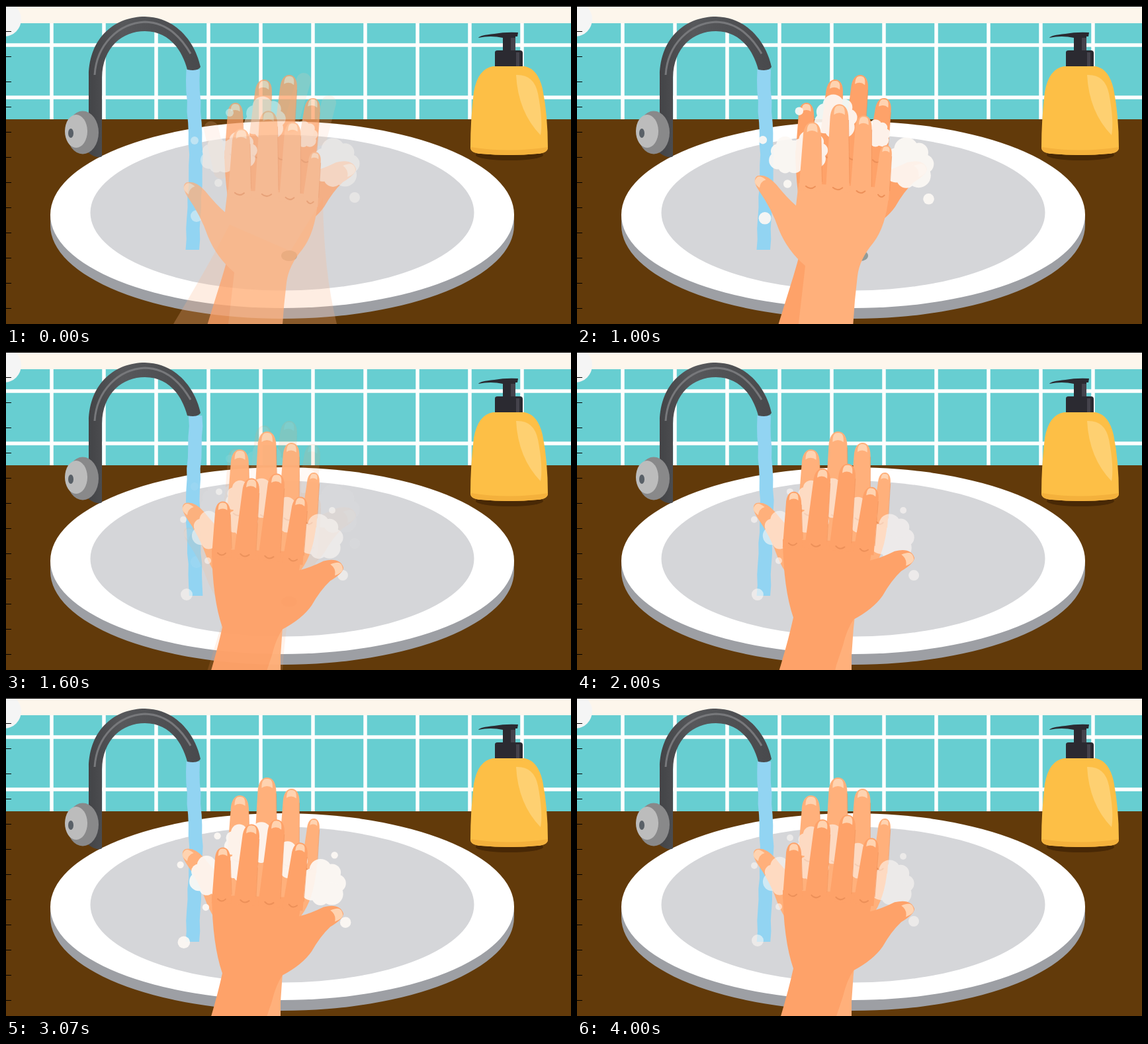
Write an HTML page that moves like this. It is 854 by 480 pixels and loops after 4070 ms.

```html
<!DOCTYPE html>
<html lang="en">
<head>
<meta charset="utf-8">
<title>Hand washing</title>
<style>
  html, body { margin: 0; width: 100%; height: 100%; overflow: hidden; background: #623a0a; }
  svg { display: block; width: 100vw; height: 100vh; }
  .left { fill: #ffb07b; }
  .right { fill: #fea269; }
  .nail { fill: #ffd3b0; }
  .crease { fill: none; stroke: #ec9059; stroke-width: 2; stroke-linecap: round; }
  .edge { fill: none; stroke: #ee9159; opacity: .6; }
  .foam { fill: #fdf9f5; }
</style>
</head>
<body>
<svg viewBox="0 0 854 480" preserveAspectRatio="none">
  <defs>
    <linearGradient id="pipe" x1="0" x2="1">
      <stop offset="0" stop-color="#434447"/><stop offset=".3" stop-color="#57585b"/>
      <stop offset="1" stop-color="#48494c"/>
    </linearGradient>
    <g id="leftHand" class="left">
      <path d="M332 570 L334 480 Q341 420 345 385 Q318 362 305 330 Q295 300 274 270 Q264 254 273 249
        Q287 246 301 262 Q318 283 331 294 L335 260 L449 266 L471 280 Q467 325 448 350 Q427 375 424 400
        Q419 440 417 480 V570Z"/>
    </g>
    <g id="rightHand" class="right">
      <path d="M280 570 L308 480 Q320 440 327 408 Q312 365 311 290 L448 294 L443 322 Q460 318 480 308
        Q505 302 510 318 Q510 326 490 338 Q475 352 462 375 Q448 395 418 411 Q408 425 402 450 L392 480 L370 570Z"/>
    </g>
  </defs>

  <rect width="854" height="26" fill="#fdf6ec"/>
  <rect y="26" width="854" height="146" fill="#67ced1"/>
  <path id="grout" stroke="#fdfefd" stroke-width="5.500"/>
  <rect y="171" width="854" height="309" fill="#623a0a"/>

  <path d="M67 315 V331 A350.5 141 0 0 0 768 331 V315Z" fill="#9d9fa4"/>
  <ellipse cx="417.5" cy="315" rx="350.5" ry="141" fill="#fff"/>
  <ellipse cx="417.5" cy="312" rx="290" ry="117.5" fill="#d5d6d9"/>
  <ellipse cx="428" cy="377" rx="12" ry="8" fill="#929b98"/>

  <path id="water" fill="#92d4f2"/>

  <path d="M125 222 V105 C126 46 166 16 210 16 C258 17 286 55 294 92 Q290 99 274 96
    C266 66 246 38 210 38 C176 38 146 62 145 108 V227 Q138 231 125 222Z" fill="url(#pipe)"/>
  <path d="M134 104 C137 58 170 26 210 24 Q252 25 279 72" fill="none" stroke="#77787b" stroke-width="3"/>
  <ellipse cx="116" cy="191" rx="24" ry="32.5" fill="#89898a"/>
  <ellipse cx="106" cy="189" rx="17" ry="25" fill="#bcbcbc"/>
  <ellipse cx="98" cy="192" rx="4" ry="7" fill="#596067"/>

  <ellipse cx="761" cy="225" rx="51" ry="8" fill="#482805"/>
  <path d="M736 91 Q713 95 707 130 Q702 172 702 214 Q702 222 718 223 Q761 227 803 223 Q819 222 819 214
    Q819 165 811 125 Q804 95 784 91Z" fill="#fdbf46"/>
  <path d="M703 213 Q761 222 819 213 Q819 222 803 223 Q761 227 718 223 Q702 222 703 213Z" fill="#f4b13c"/>
  <path d="M771 104 Q798 103 804 132 Q812 174 808 195 Q774 160 771 104Z" fill="#fed071"/>
  <path d="M739 91 V70 Q739 67 743 67 H751 V48 Q733 44 714 48 Q716 44 738 42 Q755 39 774 40 L773 46
    H770 V67 H777 Q781 67 781 71 V91Z" fill="#2b2a31"/>
  <path d="M763 48 H770 V67 H763Z M771 70 H776 V91 H771Z" fill="#45434c"/>

  <g id="trace">
    <path d="M338 330 Q310 385 253 480 H500 Q480 400 479 290 L430 370Z" fill="#fdb98f"/>
    <path d="M310 185 L325 250 M450 112 L430 180 M488 146 L474 200" stroke="#fdc9a8" stroke-width="22"
      stroke-linecap="round" opacity=".7"/>
  </g>
  <g id="sceneA">
    <use href="#rightHand" x="19" y="-72"/>
    <g id="foamA" class="foam"></g>
    <use id="frontA" href="#leftHand"/>
  </g>
  <g id="sceneB">
    <use href="#leftHand" x="-2" y="-21"/>
    <g id="foamB" class="foam"></g>
    <use id="frontB" href="#rightHand"/>
  </g>

  <circle cx="-3" cy="20" r="26" fill="#f5f5f5"/>
  <path id="ticks" stroke="#000"/>
  <rect width="854" height="1"/>
</svg>
<script>
const LOOP = 4070, STEP = 1000 / 15, LAST = 60, SWITCH = 1600, END = 4000, RUB = 740;
const $ = id => document.getElementById(id);
const wave = turns => Math.cos(2 * Math.PI * turns);
const clamp = v => Math.min(1, Math.max(0, v));
const range = (n, f) => Array.from({ length: n }, (_, i) => f(i));
const set = (id, name, value) => $(id).setAttribute(name, value);

set('grout', 'd', range(10, i => `M${69 + 79 * i} 26V171`).join('') + 'M0 59H854M0 138H854');
set('ticks', 'd', range(12, i => `M0 ${38.5 + 38 * i}H8`).join(''));

// Fingertip at the local origin, pointing up
function nail(x, y, angle, w) {
  const a = w * .23, b = w * .44;
  return `<path class="nail" transform="translate(${x} ${y}) rotate(${angle})"
    d="M${-a} ${b} C${-a} ${b * .3} ${-a * .7} 2 0 2 S${a} ${b * .3} ${a} ${b} Q0 ${b * .65} ${-a} ${b}Z"/>`;
}

// A tapered finger from the knuckle to the tip
function finger(x, y, baseX, baseY, w) {
  const len = Math.hypot(x - baseX, y - baseY);
  const angle = Math.atan2(x - baseX, baseY - y) * 180 / Math.PI;
  const a = w * .39, top = w * .65 - len, bend = w * .2 - len;
  return `<g transform="translate(${baseX} ${baseY}) rotate(${angle})">
    <path d="M${-w / 2} 8 L${-a} ${top} C${-a} ${bend} ${-a * .55} ${-len} 0 ${-len}
      S${a} ${bend} ${a} ${top} L${w / 2} 8Z"/>
    <path class="edge" d="M${a} ${top} L${w / 2} -6"/>
    <path class="crease" d="M${-w * .2} 1 q${w * .2} 6 ${w * .4} 0"/>
  </g>` + nail(x, y, angle, w);
}

$('leftHand').innerHTML += finger(356, 168, 353, 264, 35) + finger(397, 141, 394, 266, 36)
  + finger(434, 158, 429, 271, 32) + finger(468, 203, 460, 277, 24) + nail(269, 252, -52, 34);
$('rightHand').innerHTML += finger(328, 218, 326, 295, 30) + finger(372, 183, 361, 297, 33)
  + finger(410, 176, 398, 300, 33) + finger(446, 211, 434, 304, 31) + nail(510, 315, 68, 40);

const bubble = (x, y, r) => `<circle cx="${x}" cy="${y}" r="${r}"/>`;
// A lump of foam: a core ringed by lobes of alternating size
const puff = (x, y, r) => bubble(x, y, r * .65) + range(7, i =>
  bubble(x + r * .58 * wave(i / 7), y + r * .58 * wave(i / 7 - .25), r * (i % 2 ? .48 : .38))).join('');

$('foamA').innerHTML = puff(321, 226, 27) + puff(354, 218, 27) + puff(392, 170, 32) + puff(452, 194, 20)
  + puff(499, 238, 37) + bubble(285, 203, 6) + bubble(288, 317, 9) + bubble(321, 267, 6)
  + bubble(527, 289, 8) + bubble(338, 161, 6);
$('foamB').innerHTML = puff(310, 270, 29) + puff(357, 220, 25) + puff(390, 222, 30) + puff(358, 255, 24)
  + puff(428, 247, 27) + puff(477, 280, 34) + bubble(273, 366, 9) + bubble(322, 211, 5)
  + bubble(509, 337, 8) + bubble(493, 239, 5) + bubble(268, 253, 5) + bubble(305, 315, 5);

// Foam swells slowly, whitens, then shrinks back
function drawFoam(id, cx, cy, progress) {
  const swell = Math.sin(Math.PI * clamp(progress) ** 1.6) ** 2;
  const scale = 1 + .036 * swell;
  set(id, 'transform', `translate(${cx} ${cy}) scale(${scale}) translate(${-cx} ${-cy})`);
  set(id, 'opacity', .58 + .34 * swell);
}

function drawWater(t) {
  const sway = wave(4 * t / LOOP);
  const edge = range(18, i => [
    274.3 - 2.3 * sway * wave(i / 17) + .6 * Math.sin(i * 2.4 + sway), 96 + 16 * i
  ]);
  const far = edge.map(([x, y]) => [x + 20.5, y]).reverse();
  set('water', 'd', `M${edge.concat(far).join('L')}Z`);
}

function draw(t) {
  const arrive = clamp(.75 + t / 540);
  const mix = clamp((t - 1330) / 320);
  set('trace', 'opacity', 1 - arrive);
  set('sceneA', 'opacity', arrive * (1 - mix));
  set('sceneB', 'opacity', 1 - (1 - mix) ** 2);
  set('frontA', 'y', 9 + 9 * wave(t / RUB - .07));
  set('frontB', 'y', 7.5 * wave((t - SWITCH) / RUB));
  drawFoam('foamA', 400, 225, t / SWITCH);
  drawFoam('foamB', 391, 288, (t - SWITCH) / (END - SWITCH));
  drawWater(t);
}

const start = performance.now();
function tick() {
  const t = (performance.now() - start) % LOOP;
  draw(Math.min(LAST, Math.floor((t + 4) / STEP)) * STEP);
  requestAnimationFrame(tick);
}
tick();
</script>
</body>
</html>
```
